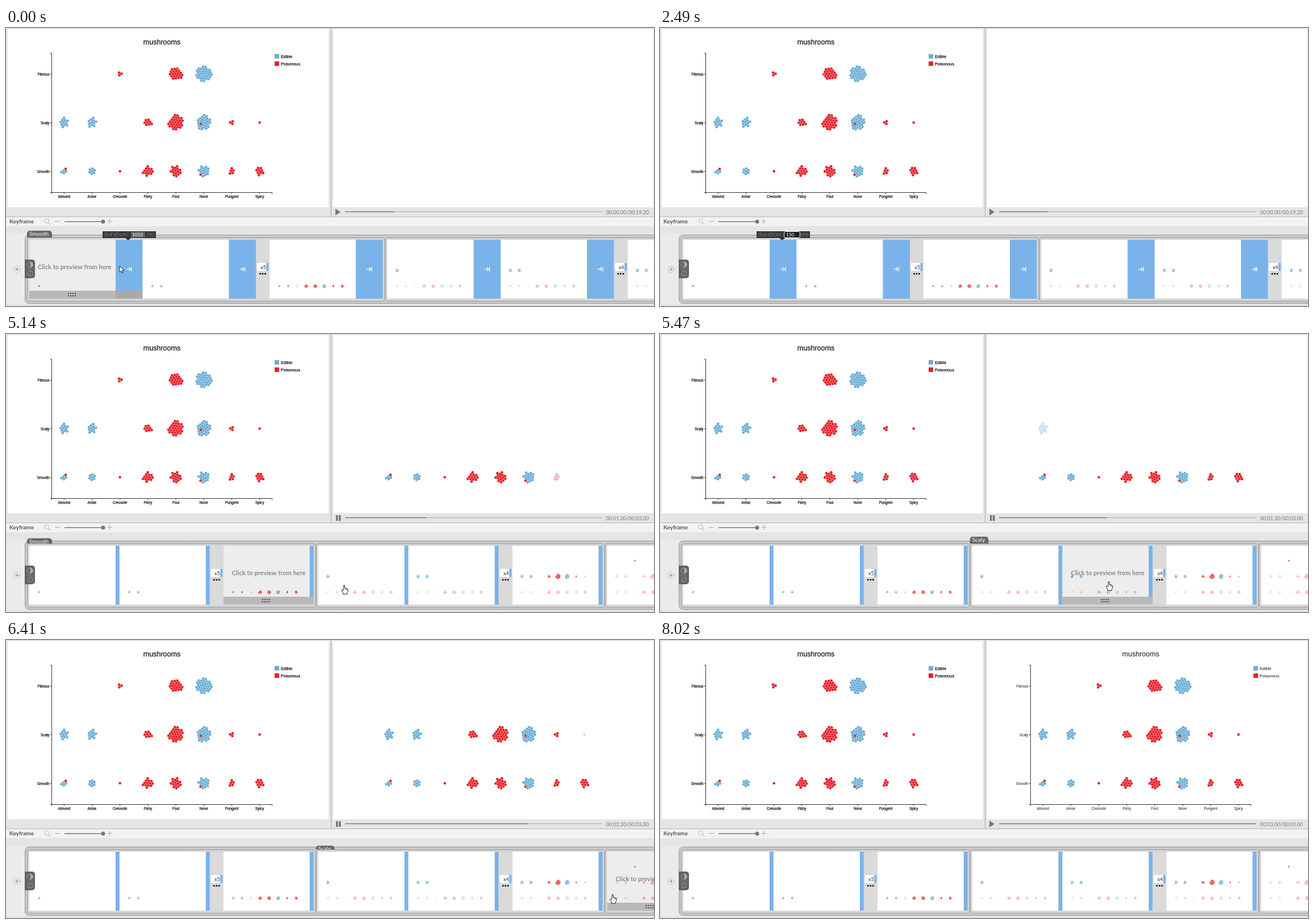
Write an HTML page with a canvas that moves like this. It is 1141 px wide and 491 px high and loops after 8260 ms.

```html
<!DOCTYPE html>
<html>
<head>
<meta charset="utf-8">
<style>
html, body { margin: 0; width: 100%; height: 100%; overflow: hidden; background: #e5e5e5; }
canvas { display: block; }
</style>
</head>
<body>
<canvas id="stage" width="1141" height="491"></canvas>
<script>
const ctx = document.getElementById('stage').getContext('2d');
const LOOP = 8260, APPLY = 3830, THUMBS_READY = 4290;
const BLUE = '#6baed6', RED = '#e6212a', LINK = '#7ab3ea';
const SANS = '"Liberation Sans", Arial, sans-serif', LATO = 'Lato, sans-serif';
const ODORS = ['Almond', 'Anise', 'Creosote', 'Fishy', 'Foul', 'None', 'Pungent', 'Spicy'];
const ROWS = [['Smooth', 253], ['Scaly', 167], ['Fibrous', 81]];
const colX = c => 102.3 + 49.2 * c;
const clamp01 = v => Math.max(0, Math.min(1, v));

// ---------- drawing helpers ----------
function rect(x, y, w, h, fill) { ctx.fillStyle = fill; ctx.fillRect(x, y, w, h); }

function box(x, y, w, h, r, fill, stroke) {
  ctx.beginPath();
  ctx.roundRect(x, y, w, h, r);
  if (fill) { ctx.fillStyle = fill; ctx.fill(); }
  if (stroke) { ctx.strokeStyle = stroke; ctx.lineWidth = 1; ctx.stroke(); }
}

function line(color, width, ...pts) {
  ctx.beginPath();
  for (let i = 0; i < pts.length; i += 2) ctx.lineTo(pts[i], pts[i + 1]);
  ctx.strokeStyle = color; ctx.lineWidth = width; ctx.stroke();
}

function shape(fill, stroke, ...pts) {
  ctx.beginPath();
  for (let i = 0; i < pts.length; i += 2) ctx.lineTo(pts[i], pts[i + 1]);
  ctx.closePath();
  ctx.fillStyle = fill; ctx.fill();
  if (stroke) { ctx.strokeStyle = stroke; ctx.lineWidth = 1; ctx.lineJoin = 'round'; ctx.stroke(); }
}

function disc(x, y, r, fill, stroke) {
  ctx.beginPath();
  ctx.arc(x, y, r, 0, 2 * Math.PI);
  if (fill) { ctx.fillStyle = fill; ctx.fill(); }
  if (stroke) { ctx.strokeStyle = stroke; ctx.lineWidth = 1; ctx.stroke(); }
}

function text(str, x, y, font, color, align = 'left') {
  ctx.font = font; ctx.fillStyle = color; ctx.textAlign = align;
  ctx.fillText(str, x, y);
}

function withState(draw) { ctx.save(); draw(); ctx.restore(); }

// ---------- chart ----------
// Packed dots: the n hexagonal lattice points nearest the middle.
function packedDots(n, angle) {
  const step = 4.75, dots = [];
  for (let i = -6; i <= 6; i++) for (let j = -6; j <= 6; j++) {
    const x = (i + j / 2) * step, y = j * step * 0.866;
    dots.push([x * Math.cos(angle) - y * Math.sin(angle), x * Math.sin(angle) + y * Math.cos(angle)]);
  }
  const dist = p => Math.hypot(p[0] - 0.7, p[1] - 0.5);
  dots.sort((a, b) => dist(a) - dist(b));
  const kept = dots.slice(0, n);
  const mean = k => kept.reduce((s, p) => s + p[k], 0) / n;
  const mx = mean(0), my = mean(1);
  return kept.map(([x, y]) => [x - mx, y - my]);
}

// Dot count per odor, then an optional odd red dot: odor -> offset.
const COUNTS = [[5, 7, 1, 13, 15, 16, 5, 9], [11, 11, 0, 8, 29, 27, 3, 1], [0, 0, 3, 0, 21, 32, 0, 0]];
const ODD = [{ 0: [1.5, -4], 5: [-4, 7] }, { 5: [-5, 1] }, {}];
const clusters = [];
COUNTS.forEach((counts, row) => counts.forEach((n, col) => {
  if (!n) return;
  const odd = ODD[row][col], blue = col < 2 || col === 5;
  const dots = packedDots(n, 0.4 + col * 1.3 + row * 0.8);
  const gap = p => Math.hypot(p[0] - odd[0], p[1] - odd[1]);
  const oddDot = odd && dots.reduce((a, b) => gap(a) < gap(b) ? a : b);
  clusters.push({
    row, x: colX(col), y: ROWS[row][1],
    dots: dots.map(p => [...p, blue && p !== oddDot ? BLUE : RED])
  });
}));

function drawCluster(c, alpha) {
  if (alpha <= 0) return;
  ctx.globalAlpha = alpha;
  for (const [x, y, color] of c.dots) disc(c.x + x, c.y + y, 2.35, color);
  ctx.globalAlpha = 1;
}

function drawAxes(alpha, heavy) {
  if (alpha <= 0) return;
  ctx.globalAlpha = alpha;
  const label = (str, x, y, size, align) => {
    text(str, x, y, `${size}px ${SANS}`, '#111', align);
    if (heavy) { ctx.strokeStyle = '#111'; ctx.lineWidth = 0.25; ctx.strokeText(str, x, y); }
  };
  label('mushrooms', 274.5, 29, 12.5, 'center');
  line('#333', 1, 78, 44.5, 80.5, 44.5, 80.5, 290.5, 78, 290.5);
  line('#333', 1, 80.5, 293, 80.5, 290.5, 468.5, 290.5, 468.5, 293);
  ODORS.forEach((name, c) => {
    line('#333', 1, colX(c), 290.5, colX(c), 293);
    label(name, colX(c), 299.5, 6.3, 'center');
  });
  for (const [name, y] of ROWS) {
    line('#333', 1, 78, y + 0.5, 80.5, y + 0.5);
    label(name, 76.5, y + 2.5, 6.3, 'right');
  }
  rect(473, 46, 8, 8, BLUE);
  rect(473, 59, 8, 8, RED);
  label('Edible', 484, 53, 7.3);
  label('Poisonous', 484, 66, 7.3);
  ctx.globalAlpha = 1;
}

// ---------- playback ----------
const elapsedAt = t => t < THUMBS_READY ? 0.046 : Math.min(3, 0.95 + (t - 5140) * 0.00093);

function drawPreview(t) {
  const started = t >= APPLY, elapsed = started ? elapsedAt(t) : 0;
  if (started) withState(() => {
    ctx.translate(572, 0);
    clusters.forEach((c, i) => drawCluster(c, clamp01(elapsed / 0.15 - i)));
    drawAxes(clamp01((elapsed - 2.7) / 0.3), false);
  });
  if (started && elapsed < 3) {
    rect(581, 320, 3.5, 10, '#777');
    rect(586, 320, 3.5, 10, '#777');
  } else shape('#777', null, 580, 319, 589, 325, 580, 331);
  line('#aaa', 1, 597, 324.5, 1050, 324.5);
  line('#777', 1.4, 597, 324.5, started ? 597 + 453 * elapsed / 3 : 683, 324.5);
  const clock = started ? `00:0${(Math.ceil(elapsed * 10 - 1e-6) / 10).toFixed(2)}/00:03.00` : '00:00.00/00:19.20';
  text(clock, 1132, 328.5, `9px ${LATO}`, '#777', 'right');
}

// ---------- timeline ----------
const TILE = 152, GAP = 24;
const tileHovers = [[0, 0, 0, 600], [0, 1, 4450, 4760], [0, 2, 4760, 5200], [1, 0, 5240, 5380],
  [1, 1, 5380, 5560], [1, 2, 5560, 6380], [2, 0, 6400, 7650]];
const labelHovers = [[0, -200, 540], [0, 4450, 5110], [1, 5230, 6350], [2, 6400, 7630]];

function drawThumb(x, group, count) {
  withState(() => {
    ctx.beginPath(); ctx.rect(x, 374, TILE, 104); ctx.clip();
    ctx.translate(x - 16, 374.3);
    ctx.scale(0.323, 0.323);
    let shown = 0;
    for (const c of clusters) {
      if (c.row < group) drawCluster(c, 0.36);
      else if (c.row === group && shown++ < count) drawCluster(c, 1);
    }
  });
}

function drawTile(x, link, group, index, t) {
  rect(x, 374, TILE, 104, '#fff');
  rect(x + TILE, 374, link, 104, LINK);
  if (t < APPLY || t >= THUMBS_READY) drawThumb(x, group, index < 2 ? index + 1 : 8);
  if (link > 20) {
    const cx = x + TILE + link / 2, y = 426;
    line('#fff', 1.2, cx - 5, y, cx + 2.5, y);
    line('#fff', 1.2, cx - 0.5, y - 3.2, cx + 2.7, y, cx - 0.5, y + 3.2);
    line('#fff', 1.2, cx + 4.2, y - 4, cx + 4.2, y + 4);
  }
  if (tileHovers.some(([g, i, a, b]) => g === group && i === index && t >= a && t < b)) {
    rect(x, 374, TILE, 104, 'rgba(0,0,0,.07)');
    rect(x, 464, TILE + link, 14, '#b9b9b9');
    if (link > 20) rect(x + TILE, 464, link, 14, '#a9a9a9');
    for (let k = 0; k < 8; k++) rect(x + 68 + 4 * (k % 4), k < 4 ? 468 : 472, 2, 2, '#444');
    text('Click to preview from here', x + 15, 426, `bold 11px ${LATO}`, '#8a8a8a');
  }
}

function drawGroup(x, link, group, t) {
  const width = 3 * (TILE + link) + GAP;
  box(x - 3.5, 370.5, width + 7, 112, 5, '#d6d6d6', '#999');
  for (let i = 0; i < 3; i++) drawTile(x + i * (TILE + link) + (i > 1 ? GAP : 0), link, group, i, t);
  const gx = x + 2 * (TILE + link);
  rect(gx, 374, GAP, 104, '#dadada');
  rect(gx + 2, 415, 16.5, 14, '#fff');
  rect(gx + 18.5, 415, 4, 14, LINK);
  text('x' + (5 - group), gx + 18, 426, `9px ${LATO}`, '#333', 'right');
  for (let k = 0; k < 3; k++) disc(gx + 7.5 + 4.5 * k, 434, 1.6, '#111');
  return width + 8;
}

function drawLabel(x, group, t) {
  let rise = 0;
  for (const [g, a, b] of labelHovers)
    if (g === group) rise = Math.max(rise, Math.min(clamp01((t - a) / 150), clamp01(1 - (t - b) / 150)));
  if (!rise) return;
  withState(() => {
    ctx.beginPath(); ctx.rect(0, 350, 1141, 20); ctx.clip();
    const y = 358 + 13 * (1 - rise), name = ROWS[group][0];
    ctx.font = `10px ${LATO}`;
    box(x - 4, y, ctx.measureText(name).width + 10, 18, 5, '#666');
    text(name, x, y + 9, `10px ${LATO}`, '#fff');
  });
}

function drawTimeline(t) {
  rect(2, 364, 40, 123, '#ebebeb');
  ctx.setLineDash([2, 1.5]);
  disc(19.5, 426, 5.5, null, '#999');
  ctx.setLineDash([]);
  line('#888', 1, 16.5, 426, 22.5, 426);
  line('#888', 1, 19.5, 423, 19.5, 429);

  box(33.5, 365.5, 1300, 121, 7, '#c9c9c9', '#999');
  const link = t < APPLY ? 47.5 : 6.9;
  for (let g = 0, x = 41; g < 3; g++) {
    const advance = drawGroup(x, link, g, t);
    drawLabel(x, g, t);
    x += advance;
  }

  box(33, 409, 18, 33, [0, 5, 5, 0], '#626262');
  disc(42.5, 418, 5, null, '#aaa');
  ctx.beginPath(); ctx.arc(42.5, 418, 5, -Math.PI / 2, Math.PI / 2);
  ctx.fillStyle = '#aaa'; ctx.fill();
  line('#808080', 1, 36, 426, 49, 426);
  box(38.5, 429.5, 8, 8, 1, null, '#999');
  line('#999', 1, 40, 436, 45, 431);
}

function drawDurationTip(t) {
  if (t >= APPLY) return;
  rect(170, 359, 94, 12, '#353535');
  shape('#353535', null, 210, 371, 220, 371, 215, 375);
  text('duration:', 172, 368, `11px ${LATO}`, '#777');
  text('ms', 248, 368, `11px ${LATO}`, '#777');
  if (t >= 1030) box(218.5, 359.5, 28, 11, 3, '#222', '#fff');
  else rect(220, 360, 25, 10, '#626262');
  text(t < 1960 ? '1050' : '150', 222, 368, `8.3px ${LATO}`, '#fff');
  if (t >= 1960 && t < 2490) rect(226, 361, 1, 7, '#fff');
}

// ---------- pointer ----------
const pointerPath = [[0, 200, 420], [90, 200, 420], [780, 232, 362], [1030, 232, 364], [1170, 230, 365],
  [1320, 221, 361.5], [1510, 217.5, 360.5], [APPLY, 218, 361], [4290, 218, 361], [4700, 330, 400],
  [5000, 515, 440], [5140, 595, 444], [5760, 961, 432], [6050, 980, 440], [6500, 1090, 452],
  [6750, 1100, 475], [7540, 1100, 475], [7950, 1108, 505], [LOOP, 1108, 505]];

function pointerAt(t) {
  const i = Math.max(1, pointerPath.findIndex(p => p[0] >= t));
  const [t0, x0, y0] = pointerPath[i - 1], [t1, x1, y1] = pointerPath[i];
  const k = (t - t0) / (t1 - t0);
  return [x0 + (x1 - x0) * k, y0 + (y1 - y0) * k];
}

const arrow = () => shape('#fff', '#222', 0, 0, 0, 11.5, 2.6, 9, 4.4, 13, 6.2, 12.2, 4.5, 8.3, 8, 8.3);

function hand() {
  shape('#fff', '#222', -1, 0, 1, 0, 1, 5, 3, 5, 5, 6, 6.5, 7, 6.5, 11, 5, 13, 5, 15.5,
    -2, 15.5, -2, 13, -5, 9, -4, 7.5, -1.5, 9);
  line('#222', 0.8, 2.5, 5, 2.5, 8);
  line('#222', 0.8, 4.5, 6, 4.5, 8.5);
}

function moveCross() {
  for (let k = 0; k < 4; k++) {
    ctx.rotate(Math.PI / 2);
    shape('#fff', '#222', -1, -1, -1, -4, -3, -4, 0, -7, 3, -4, 1, -4, 1, -1);
  }
  rect(-1, -1, 2, 2, '#fff');
}

function iBeam() {
  line('#ddd', 1, -2, -4.5, 2, -4.5);
  line('#ddd', 1, 0, -4.5, 0, 4.5);
  line('#ddd', 1, -2, 4.5, 2, 4.5);
}

function drawPointer(t) {
  if (t >= 1650 && t < APPLY) return;
  const [x, y] = pointerAt(t);
  if (t >= 1170 && t < 1650) disc(x, y, 8, 'rgba(240,225,20,.65)');
  if (t >= 6880 && t < 7630) {
    rect(1102, 476, 60, 12, '#222');
    rect(1103, 477, 60, 10, '#ffffe8');
    text('Drag to change order', 1104, 485, `8.5px ${LATO}`, '#222');
  }
  withState(() => {
    ctx.translate(x, y);
    if (t >= 780 && t < 1650) iBeam();
    else if (t < THUMBS_READY || y < 374) arrow();
    else if (y > 464) moveCross();
    else hand();
  });
}

// ---------- stage ----------
function drawFrameParts() {
  rect(0, 0, 1141, 491, '#e5e5e5');
  rect(3, 2, 565, 314.5, '#fff');
  rect(576, 2, 564, 314.5, '#fff');
  line('#aaa', 1, 572.5, 0, 572.5, 333);
  rect(0, 334, 1141, 16, '#f2f2f2');
  line('#b5b5b5', 1, 0, 333.5, 1141, 333.5);

  text('Keyframe', 6, 345, `bold 10px ${LATO}`, '#555');
  disc(71.5, 340.5, 3.8, null, '#bbb');
  line('#bbb', 1.2, 74.3, 343.3, 78, 347);
  line('#aaa', 1, 86, 341.5, 95, 341.5);
  line('#777', 1.5, 103, 342, 170, 342);
  disc(171, 342, 3.5, '#777');
  line('#aaa', 1, 178.5, 341.5, 187, 341.5);
  line('#aaa', 1, 182.5, 337, 182.5, 346);
}

function render(t) {
  drawFrameParts();
  drawAxes(1, true);
  clusters.forEach(c => drawCluster(c, 1));
  drawPreview(t);
  drawTimeline(t);
  drawDurationTip(t);
  drawPointer(t);
}

const start = performance.now();
function tick() {
  render((performance.now() - start) % LOOP);
  requestAnimationFrame(tick);
}
tick();
</script>
</body>
</html>
```
